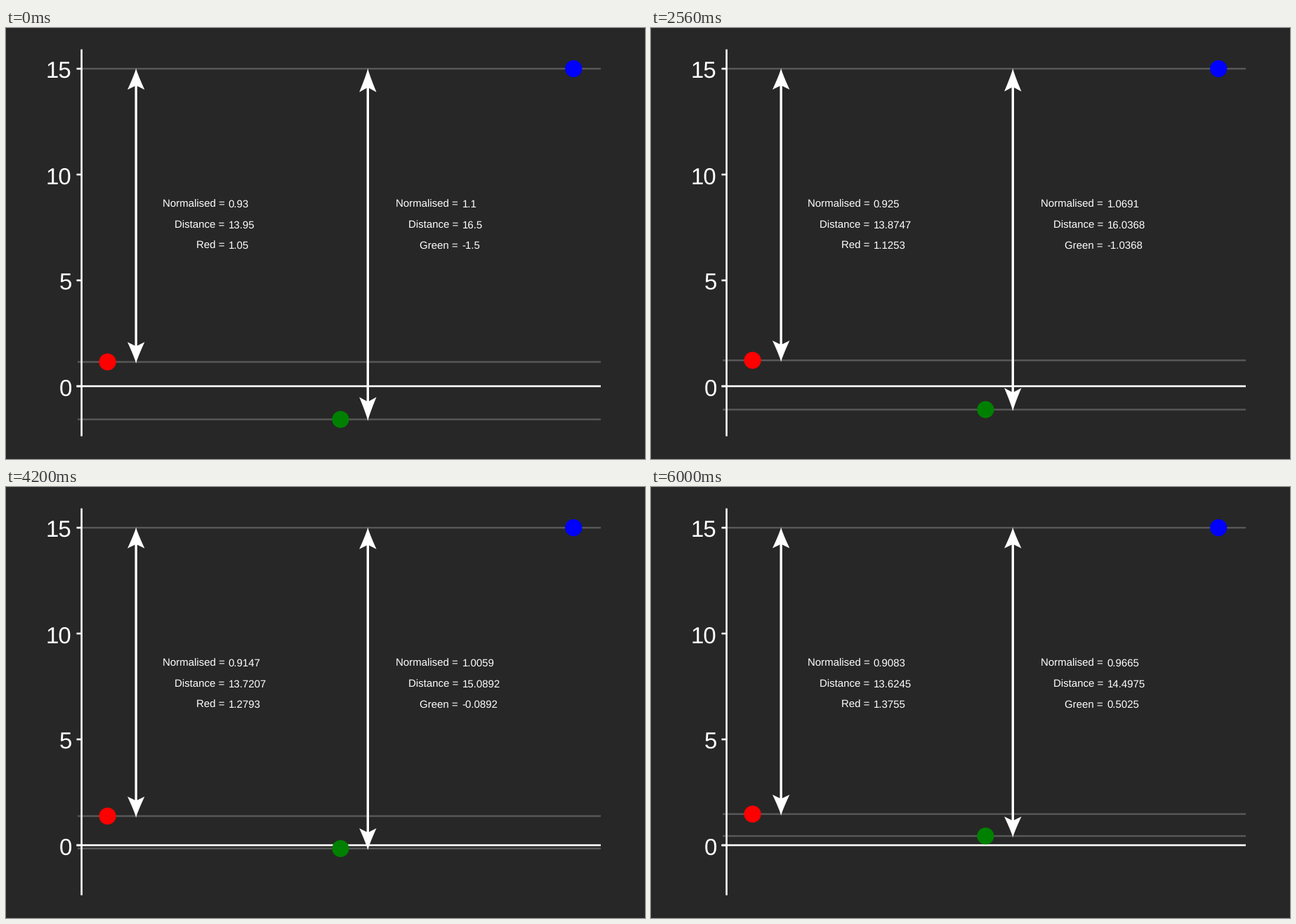
Animation, 910 px wide and 615 px high, one loop 7000 ms. Source, as a matplotlib script:

```python
import numpy as np
import matplotlib.pyplot as plt
from matplotlib.animation import FuncAnimation
from matplotlib.patches import Circle, Polygon

WIDTH, HEIGHT, DPI = 910, 615, 100
INTERVAL, FRAMES = 40, 175
MOVE_START, MOVE_TIME = 1000, 5000

BACKGROUND, GUIDE = "#272727", "#595959"
ZERO_Y, UNIT = 511.1, 30.2
AXIS_X, TICK_LEFT, GUIDE_LEFT, RIGHT = 107.6, 100.5, 102, 847
TOP_VALUE = 15
DIGIT_WIDTH = 0.556  # em

plt.rcParams["font.family"] = "Liberation Sans"
plt.rcParams["text.hinting"] = "none"
plt.rcParams["text.hinting_factor"] = 1
plt.rcParams["toolbar"] = "None"

fig = plt.figure(figsize=(WIDTH / DPI, HEIGHT / DPI), dpi=DPI, facecolor=BACKGROUND)
ax = fig.add_axes([0, 0, 1, 1])
ax.set(xlim=(0, WIDTH), ylim=(HEIGHT, 0))
ax.axis("off")


def to_y(value):
    return ZERO_Y - value * UNIT


def line(xs, ys, color="white", width=2.6, z=2):
    return ax.plot(xs, ys, color=color, lw=width * 72 / DPI, zorder=z,
                   solid_capstyle="butt", snap=False)[0]


def label(x, y, text, px, ha="left"):
    return ax.text(x, y, text, color="white", fontsize=px * 72 / DPI,
                   ha=ha, va="baseline", zorder=5)


def guide(y):
    return line([GUIDE_LEFT, RIGHT], [y, y], GUIDE, 2.4, 1)


def dot(x, y, color):
    return ax.add_patch(Circle((x, y), 12.1, color=color, lw=0, zorder=4))


def arrow_points(x, top, bottom, head):
    """Outline of a double arrow with swept-back, slightly hollow heads."""
    t = np.linspace(0, 1, 10)
    half = np.append(12.2 * t ** 1.15, 1.7)
    depth = np.append(head * t, head * 0.83)
    half = np.concatenate([half, half[::-1]])
    ys = np.concatenate([top + depth, bottom - depth[::-1]])
    return np.column_stack([np.concatenate([x + half, x - half[::-1]]),
                            np.concatenate([ys, ys[::-1]])])


class Marker:
    """A moving dot with its guide line, distance arrow and readout."""

    def __init__(self, name, color, start, end, x, shift, arrow_x, head_ratio, text_x):
        self.start, self.end, self.shift = start, end, shift
        self.arrow_x, self.head_ratio = arrow_x, head_ratio
        self.guide = guide(0)
        self.dot = dot(x, 0, color)
        self.arrow = ax.add_patch(Polygon([(0, 0), (1, 0), (1, 1)], color="white",
                                          lw=0, zorder=3))
        self.values = []
        for row, title in enumerate(("Normalised", "Distance", name)):
            y = 256 + 29.5 * row
            label(text_x - 5.6, y, f"{title} =", 15.3, "right")
            self.values.append(label(text_x, y, "", 15.3))

    def update(self, progress):
        value = self.start + (self.end - self.start) * progress
        y = to_y(value) + self.shift
        self.guide.set_ydata([y, y])
        self.dot.center = (self.dot.center[0], y)
        top, bottom = to_y(TOP_VALUE) - 0.6, y + 2.2
        self.arrow.set_xy(arrow_points(self.arrow_x, top, bottom,
                                       self.head_ratio * (bottom - top)))
        distance = TOP_VALUE - value
        for text, number in zip(self.values, (distance / TOP_VALUE, distance, value)):
            text.set_text(f"{round(number, 4):g}")


line([AXIS_X, AXIS_X], [30.5, 582.5])
line([TICK_LEFT, RIGHT], [ZERO_Y, ZERO_Y])
for tick in (0, 5, 10, 15):
    y = to_y(tick)
    line([TICK_LEFT, AXIS_X], [y, y])
    size = 33.5
    label(94.2 - len(str(tick)) * DIGIT_WIDTH * size, y + 13.2, str(tick), size)

guide(to_y(TOP_VALUE))
dot(808.2, to_y(TOP_VALUE), "#0000ff")

markers = [
    Marker("Red", "#ff0000", 1.05, 1.3755, 144.6, -2.9, 185.2, 0.0725, 316.9),
    Marker("Green", "#008000", -1.5, 0.5025, 476.4, 2.1, 515.3, 0.0676, 649.4),
]


def update(frame):
    u = min(max((frame * INTERVAL - MOVE_START) / MOVE_TIME, 0), 1)
    for marker in markers:
        marker.update(u * u * (3 - 2 * u))
    return []


animation = FuncAnimation(fig, update, frames=FRAMES, interval=INTERVAL,
                          repeat=True, repeat_delay=0, blit=False)
plt.show()
```
